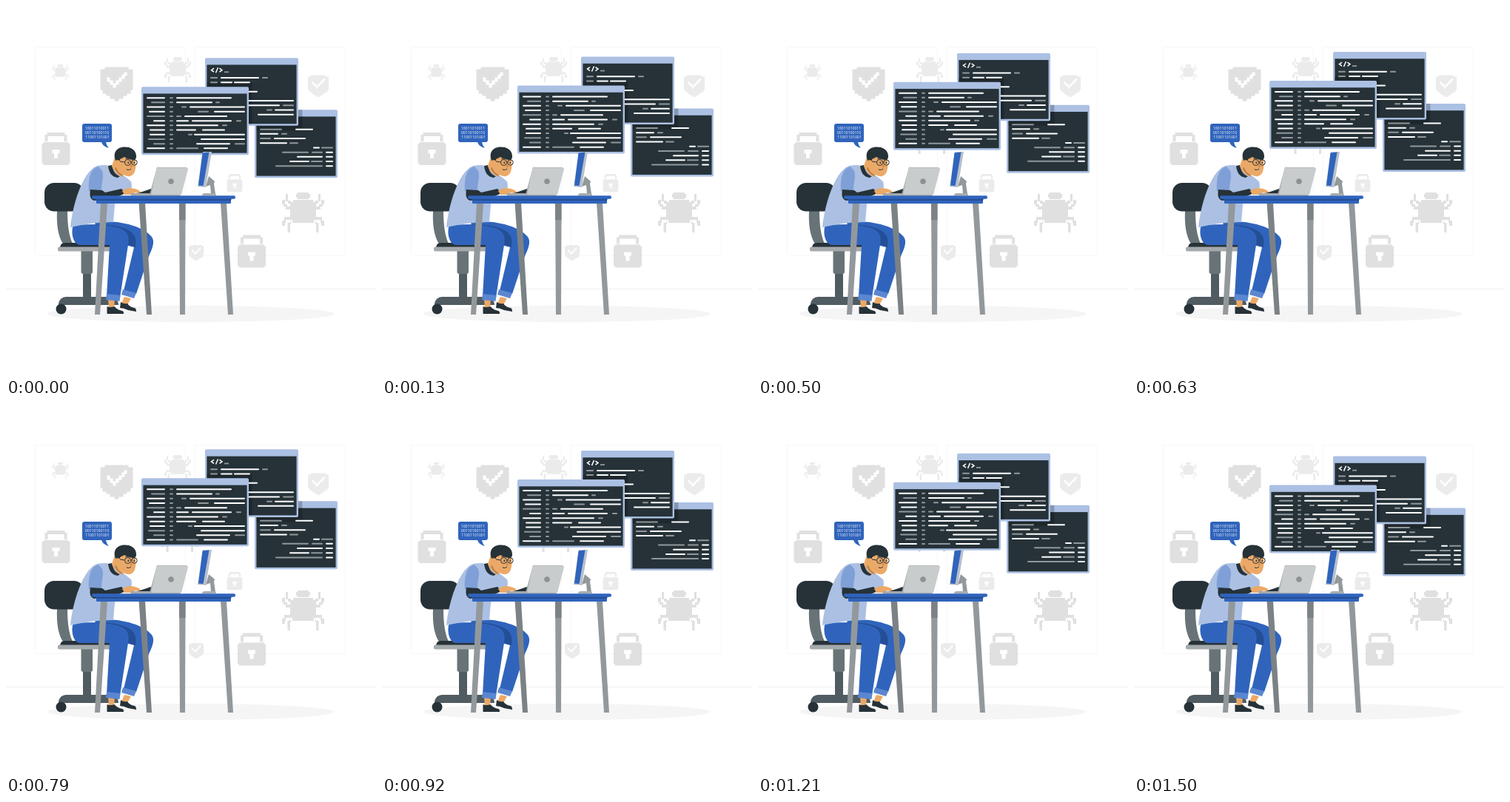
Animation of 500 by 500 pixels, one loop 1540 ms. Source, as an HTML page:

```html
<!DOCTYPE html>
<html lang="en">
<head>
<meta charset="utf-8">
<title>Coding at a desk</title>
<style>
  html, body { margin: 0; width: 100%; height: 100%; overflow: hidden; background: #fff; }
  svg { display: block; width: 100%; height: 100%; }
  .blue { fill: #3064bc; }
  .pale { fill: #abc0e3; }
  .dark { fill: #263238; }
  .skin { fill: #eba968; }
  .leg { fill: #92989b; }
  .legShade { fill: #7b8286; }
  .metal { fill: #687377; }
  .bars { fill: none; stroke-width: 2; stroke-linecap: round; }
</style>
</head>
<body>
<svg viewBox="0 0 500 500">
  <defs>
    <g id="legs">
      <path d="M5 2h3v9h4v4h-4v-3h-3zM0 10h4v6h3v3h5v4h-7v-4h-3v-3h-2zM12 33v4h-7v4h-1v4h-4v-7h3v-5zM12 39v4h-1v11h-3.500v-13h3.500v-2z"/>
    </g>
    <g id="bug">
      <path d="M21 0h15v2h2v5h-2v2h-15v-2h-2v-5h2zM15 10h27v3h4v24h-3v4h-29v-4h-3v-24h4z"/>
      <use href="#legs"/>
      <use href="#legs" transform="matrix(-1 0 0 1 57 0)"/>
    </g>
    <g id="shield">
      <path d="M6 0h32v3h6v28h-3v5h-5v3h-5v4h-6v3h-6v-3h-6v-4h-5v-3h-5v-5h-3v-28h6z"/>
      <path fill="#fff" d="M9 14h4v4h4v4h4v-4h4v-4h4v-4h3v-3h4v5h-3v4h-4v4h-4v4h-4v4h-4v-4h-4v-4h-4z"/>
    </g>
    <g id="lock">
      <path d="M4 12v-9h3v-3h24v3h3v9h-4v-7h-22v7zM2 13h34v2h2v27h-2v2h-34v-2h-2v-27h2z"/>
      <path fill="#fff" d="M14 23h10v5h-2.500v7h-5v-7h-2.500z"/>
    </g>
  </defs>

  <!-- backdrop -->
  <g fill="none" stroke="#f7f7f7">
    <rect x="39.500" y="55.500" width="203" height="282" rx="2"/>
    <rect x="255.500" y="55.500" width="203" height="282" rx="2"/>
    <path stroke="#f0f0f0" d="M0 382.500h500"/>
  </g>
  <ellipse cx="249.500" cy="416" rx="194" ry="11.200" fill="#f5f5f5"/>
  <g fill="#e0e0e0">
    <use href="#bug" transform="translate(373 252)"/>
    <use href="#shield" transform="translate(127.500 82.500)"/>
    <use href="#lock" transform="translate(48.500 171)"/>
    <use href="#lock" transform="translate(313 309.500)"/>
  </g>
  <g fill="#ebebeb">
    <use href="#bug" transform="translate(62 79) scale(.4)"/>
    <use href="#bug" transform="translate(214 69) scale(.63)"/>
    <use href="#bug" transform="translate(210 160) scale(.87 .74)" fill="#e0e0e0"/>
    <use href="#shield" transform="translate(408 93.500) scale(.64)"/>
    <use href="#shield" transform="translate(247 323) scale(.46)"/>
    <use href="#lock" transform="translate(298.500 227) scale(.55)"/>
  </g>

  <g id="windows"></g>

  <!-- chair -->
  <path class="metal" d="M69 276h14c0 20 2 34 7 45h-13c-6-9-9-23-8-45z"/>
  <rect class="dark" x="52" y="239" width="53" height="38.500" rx="13"/>
  <path class="metal" d="M101.500 330h15.500v29q0 3-3 3h-9.500q-3 0-3-3z"/>
  <path fill="#505c61" d="M104 362h11v31h24c8 0 13 4 13 11h-81c0-6 3-10 10-11h23z"/>
  <circle class="dark" cx="74.500" cy="409.500" r="7"/>
  <path class="dark" d="M73 326q1-6 6-6h62q4 0 4 6z"/>
  <rect x="70" y="325.500" width="78" height="6" rx="2" fill="#a4a9ac"/>

  <!-- legs and shoes -->
  <path class="skin" d="M138 396h9l-1 12h-7zM160 393l9 2-5 9-8-2z"/>
  <path class="dark" d="M136.500 406q5 2 10 0 4 5 11 6 2 1 1.500 4h-22.500zM155 400q4 3 9 2 3 5 10 6 2 1 2 5l-11-2q-6-3-11-3z"/>
  <path class="blue" d="M120 291c35-2 66 7 77 21 5 7 0 17-4 26l-17 51-17-4 14-59-50-13z"/>
  <path fill="#244f96" d="M110 296c30-3 58 3 63 14 3 5 3 9 2 16l-12-4z"/>
  <path class="blue" d="M91 296c26-2 48 0 62 4 12 4 14 12 12 23l-11 71-18-2 4-69h-40c-9 0-13-17-9-27z"/>
  <path fill="#5b86d0" d="M136 389l18.500 2-1 8-18.500-2zM158 383l18 5-3 7-17-5z"/>

  <!-- torso, arms and head -->
  <path class="pale" d="M87 299c3-30 16-73 34-82 8-3 20-3 28 4l20 16q3 9-3 13l-18 7-3 35q-28 0-53 6z"/>
  <path fill="#7f9fd7" d="M125 217c-10 2-14 14-13 33l17 3c-1-12 4-22 1-30z"/>
  <path class="dark" d="M138 216l5-1c2 9 5 13 11 15l-3 2c-9-1-12-8-13-16z"/>
  <path class="dark" d="M114 248l16 1 4 3 22-5 6 6-15 6-28 4c-6-2-6-8-5-15z"/>
  <path class="skin" d="M157 250q4-4 12-4 9 1 13 5l-2 2-7-1 3 3h-16z"/>
  <path class="skin" d="M143 216l5-15h26q3 14 0 23-3 7-10 6l-6-2-1 3q-10-4-14-15z"/>
  <path fill="#bb7f45" d="M149 218q2 7 8 10l1 2q-8-2-11-11z"/>
  <path class="dark" d="M149 210c-5-8-2-17 7-19 10-2 21 2 20 14l-2 3c-6 0-11-2-14-4l-6 3v5l-3 3z"/>
  <circle class="skin" cx="151" cy="212" r="3.800"/>
  <g fill="none" stroke="#263238" stroke-width="1">
    <circle cx="164.500" cy="211.500" r="4"/>
    <circle cx="173.500" cy="211.500" r="3.700"/>
    <path d="M154 210l6.500 1M168.500 211h1.500M161.500 206.500l4-.500M163 221q4 1.500 6-1"/>
  </g>
  <path fill="#d58745" d="M168 212l3 6h-3z"/>
  <path class="dark" d="M164.500 210.500h1.500v2.500h-1.500zM172.500 210.500h1.300v2.500h-1.300z"/>

  <!-- monitor -->
  <path fill="#92989b" d="M274 230l8 7-1 3 2 14h-6l-1-12-6 2z"/>
  <path fill="#a9adaf" d="M265 256q0-3 4-3h12q3 0 3 3z"/>
  <path fill="#b7c0cd" d="M266 197h12l-8 48-11-1z"/>
  <path class="blue" d="M265.500 198.500l9-1-8 45.500-6.500-.500z"/>

  <!-- laptop -->
  <path class="dark" d="M178 253l18-6v7z"/>
  <path fill="#a4a9ac" d="M168 253h69l-2 3.500h-66z"/>
  <path fill="#a4a9ac" d="M204 218h40l-9 37h-41z"/>
  <path fill="#c9cccd" d="M205 218.500h39q2.500 0 2 2l-9 34.500h-41l7-34q.500-2.500 2-2.500z"/>
  <circle cx="223" cy="237" r="3.800" fill="#8d9193"/>

  <!-- table -->
  <path class="leg" d="M128 266h9l-10 151h-7zM290 266h8l9 151h-7z"/>
  <path class="legShade" d="M179.500 266h8.500l9 151h-7z"/>
  <path class="leg" d="M234 266h8.500l-.500 151h-7z"/>
  <path class="legShade" d="M234 266h8.500v23h-8.500z"/>
  <rect class="blue" x="122" y="259" width="182" height="8" rx="1"/>
  <path fill="#244f96" d="M120 260h185l-1 3h-182z"/>
  <rect class="blue" x="116" y="256.300" width="194" height="4.400" rx="2"/>

  <!-- speech bubble -->
  <path class="blue" d="M106 159h34q3 0 3 3v19q0 3-3 3h-5q1 5 4 8-8-2-10-8h-23q-3 0-3-3v-19q0-3 3-3z"/>
  <g fill="#fff" font-family="'Open Sans', sans-serif" font-size="5.200" text-anchor="middle">
    <text x="123" y="167.300">10011010011</text>
    <text x="123" y="173.200">00110100110</text>
    <text x="123.500" y="179.100">11001101001</text>
  </g>
</svg>
<script>
const windows = document.getElementById('windows');
const ROW = 6.2, PERIOD = 1540, PHASE = 35, RISE = 10;

const frame = (x, y, w, h) =>
  `<rect class="pale" x="${x}" y="${y}" width="${w}" height="${h}" rx="2"/>
   <rect class="dark" x="${x + 2.4}" y="${y + 9.3}" width="${w - 4.8}" height="${h - 11.8}"/>`;

const shade = (x, y, w, h) =>
  `<rect x="${x}" y="${y}" width="${w}" height="${h}" opacity=".22"/>`;

// Each row lists start and end pairs; a negative start makes the bar grey.
function bars(top, rows) {
  const paths = { '#fff': '', '#90979a': '' };
  rows.forEach((row, i) => {
    for (let j = 0; j < row.length; j += 2) {
      const x = Math.abs(row[j]);
      paths[row[j] < 0 ? '#90979a' : '#fff'] += `M${x + 1} ${top + i * ROW}H${row[j + 1] - 1}`;
    }
  });
  return Object.entries(paths)
    .map(([color, d]) => `<path class="bars" stroke="${color}" d="${d}"/>`).join('');
}

const gutter = '<path class="bars" stroke="#90979a" stroke-dasharray="0" d="' +
  Array.from({ length: 12 }, (_, i) => `M222 ${124.6 + i * ROW}h3`).join('') + '"/>';

windows.innerHTML =
  frame(336, 140.6, 112, 92) + shade(338.4, 140.6, 62, 28) +
  bars(167.1, [
    [-343, 373, 391, 415], [343, 368, -372, 380], [-343, 358, 362, 405], [343, 380, -383, 395],
    [415, 424, -426, 442], [-373, 409, -413, 428, 432, 442], [393, 428, 432, 442],
    [383, 410, -412, 428, 432, 442], [-364, 428, 432, 442]
  ]) +
  frame(269, 70.6, 126, 91.6) + shade(271.4, 104, 61, 55.7) +
  `<path fill="none" stroke="#fff" stroke-width="1.500" d="M281 84.700l-3.500 2.500 3.500 2.500M286.500 83.700l-3 7M288.500 84.700l3.500 2.500-3.500 2.500"/>
   <path stroke="#90979a" stroke-width="1.800" d="M295 89.700h6"/>` +
  bars(97.5, [
    [-276, 286, 290, 342, -346, 354], [-276, 286, 290, 306, 308, 330], [], [290, 340], [],
    [300, 389], [300, 370, -374, 389], [-352, 360, 363, 389], [340, 389]
  ]) +
  frame(183, 109.6, 145, 92) + gutter +
  bars(124.6, [
    [190, 215, 230, 305],
    [-196, 215, 230, 279, -283, 289],
    [190, 215, -237, 244, 248, 323],
    [193, 215, -259, 274, 281, 323],
    [-190, 215, -230, 237, 241, 299],
    [199, 215, 230, 247, 251, 305, -311, 318],
    [190, 215, 230, 287, -292, 299],
    [194, 215, 230, 257, 265, 296],
    [194, 215, -246, 252, 254, 323],
    [-192, 215, 263, 323],
    [-199, 215, 257, 303, -309, 323],
    [190, 215, -230, 260, 267, 300]
  ]);

function draw(now) {
  const phase = (now + PHASE) % PERIOD / PERIOD;
  const y = -RISE * (1 - Math.abs(1 - 2 * phase));
  windows.setAttribute('transform', `translate(0 ${y})`);
  requestAnimationFrame(draw);
}
draw(performance.now());
</script>
</body>
</html>
```
